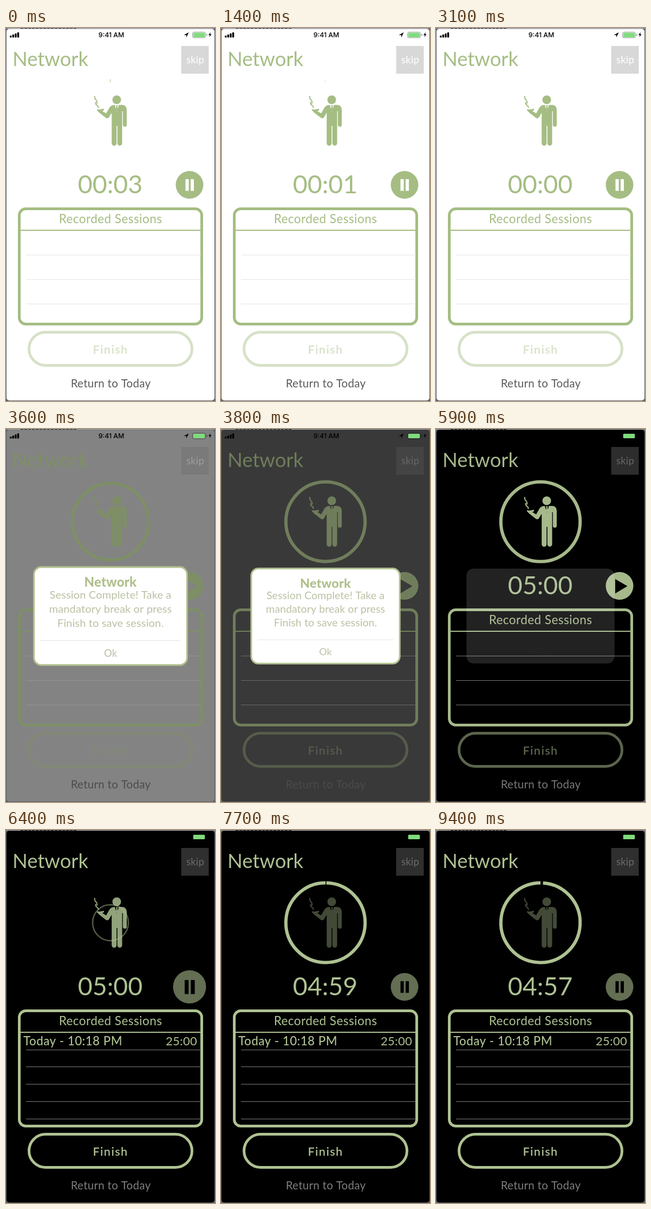
Write an HTML page with a canvas that moves like this. It is 386 px wide and 686 px high and loops after 9500 ms.

```html
<!DOCTYPE html>
<html lang="en">
<head>
<meta charset="utf-8">
<title>Session timer</title>
<style>
  html, body { margin: 0; overflow: hidden; background: #5a5c66; }
  canvas { display: block; width: 386px; height: 686px; }
</style>
</head>
<body>
<canvas id="stage" width="386" height="686"></canvas>
<script>
const ctx = document.getElementById('stage').getContext('2d');
const LOOP = 9500, ALERT = 3500, DISMISS = 5600, START = 6200;

const man = new Path2D(`
  M196.500 132a8 8 0 1 1 16 0a8 8 0 1 1 -16 0z
  M201 141.500L204.500 154L208.500 141.500H215Q223 142 223 151V178a3.600 3.600 0 0 1 -7.200 0V153H214.500
  V212a4.400 4.400 0 0 1 -8.800 0V180H204.200V212a4.500 4.500 0 0 1 -9 0V156L190 164.500
  Q187.500 167.500 183.500 164.500L172 155.500Q170 153 168 151.500V149.500L173 150L181 148.500V151L178 153L185 157
  L191 146.500Q194 141.500 201 141.500z
  M203 142H206.500L205.800 145L207 150L204.800 153L202.800 150L203.800 145z`);
const smoke = new Path2D('M164 125Q163 129 166 132T168 139M165.500 136Q165 140 168 142T170.500 147');
const arrow = new Path2D('M328.500 13L337.500 8L333 17.500V13z');
const bolt = new Path2D('M378 7.500L374 13H376.500L375.500 17L379.500 11.500H377z');
const play = new Path2D('M331 276L353.500 289L331 302.500z');

const clamp = x => Math.max(0, Math.min(1, x));
const span = (t, from, to) => clamp((t - from) / (to - from));
const smooth = p => p * p * (3 - 2 * p);
const blend = (a, b, p) => `rgb(${a.map((v, i) => v + (b[i] - v) * p)})`;
const grey = (a, b, p) => blend([a, a, a], [b, b, b], p);

function text(str, x, y, size, color, { weight = 400, align = 'center', space = 0, family = 'Lato' } = {}) {
  ctx.font = `${weight} ${size}px ${family}, sans-serif`;
  ctx.letterSpacing = space + 'px';
  ctx.textAlign = align;
  ctx.fillStyle = color;
  ctx.fillText(str, x, y);
}

function box(x, y, w, h, r, { fill, stroke, width = 1 }) {
  ctx.beginPath();
  ctx.roundRect(x, y, w, h, r);
  if (fill) { ctx.fillStyle = fill; ctx.fill(); }
  if (stroke) { ctx.strokeStyle = stroke; ctx.lineWidth = width; ctx.stroke(); }
}

function rule(y, x1, x2, color, width = 1) {
  ctx.fillStyle = color;
  ctx.fillRect(x1, y, x2 - x1, width);
}

// Draws a part with its own opacity and its own scale about (x, y)
function group(alpha, scale, x, y, draw) {
  ctx.save();
  ctx.globalAlpha *= alpha;
  ctx.translate(x, y);
  ctx.scale(scale, scale);
  ctx.translate(-x, -y);
  draw();
  ctx.restore();
}

function drawStatus() {
  for (let i = 0; i < 4; i++) box(7 + i * 4.6, 14 - i * 2, 3.4, 3.5 + i * 2, 1, { fill: '#000' });
  text('9:41 AM', 194.5, 17, 12.3, '#000', { weight: 500, family: 'Inter' });
  ctx.fill(arrow);
  box(344.5, 7.5, 24, 10.5, 3, { stroke: 'rgba(0,0,0,.4)' });
  box(345.7, 8.7, 21.5, 8.3, 1.5, { fill: '#7fdc7c' });
  box(370, 10.8, 1.5, 4, 1, { fill: 'rgba(0,0,0,.4)' });
  ctx.fillStyle = '#000';
  ctx.fill(bolt);
}

function drawRing(green, left, scale, alpha) {
  group(alpha, scale, 193, 170.5, () => {
    ctx.beginPath();
    ctx.arc(193, 170.5, 73.2, -Math.PI / 2 - left * 2 * Math.PI, -Math.PI / 2);
    ctx.strokeStyle = green;
    ctx.lineWidth = 6;
    ctx.stroke();
  });
}

function drawButton(green, back, running, scale, alpha) {
  group(1, scale, 339, 288.5, () => {
    group(alpha, 1, 0, 0, () => box(313.5, 263, 51, 51, 25.5, { fill: green }));
    ctx.fillStyle = back;
    if (running) {
      ctx.fillRect(331.5, 278, 6, 21.5);
      ctx.fillRect(341, 278, 6, 21.5);
    } else {
      ctx.fill(play);
    }
  });
}

function drawAlert(alpha, scale, divider) {
  const green = '#b0bf8c', soft = '#bac2a4';
  group(alpha, scale, 193, 344, () => {
    box(56.5, 257, 273, 174, 13, { fill: '#fff' });
    // Contents fade with the panel below them
    ctx.globalAlpha *= alpha;
    box(56.5, 257, 273, 174, 13, { stroke: green, width: 3 });
    text('Network', 193, 292, 23.2, green, { weight: 800, space: 0.2 });
    ['Session Complete! Take a', 'mandatory break or press', 'Finish to save session.']
      .forEach((line, i) => text(line, 193, 313 + i * 25, 19.4, soft, { space: 0.1 }));
    rule(387, 68, 318, `rgba(225,225,225,${divider})`);
    text('Ok', 193, 416, 18, soft);
  });
}

function clock(t) {
  if (t < ALERT) return 3 - (t >= 400) - (t >= 1400) - (t >= 2400);
  return 300 - Math.floor(Math.max(0, t - 6300) / 1000);
}

function draw(t) {
  const dark = span(t, 3420, 4000);
  const green = blend([165, 189, 131], [174, 194, 146], dark);
  const back = grey(255, 0, dark);
  const isBreak = t >= ALERT, started = t >= START;
  const pop = smooth(span(t, START, 6630));
  const secs = clock(t);
  const fade = t < START ? Math.exp(-Math.max(0, t - DISMISS) / 150) : 0;
  const alertAlpha = fade * span(t, 3430, 3590);
  const dim = 0.35 * fade * span(t, 3430, 3670);

  ctx.fillStyle = '#5a5c66';
  ctx.fillRect(0, 0, 386, 686);
  rule(0, 0, 386, '#a9abb2');
  for (let x = 27; x < 126; x += 7) rule(0, x, x + 5, '#33343a', 1.5);

  ctx.save();
  box(1, 1.5, 384, 683.5, 5, { fill: back });
  ctx.clip();

  text('Network', 12, 70, 36.4, green, { align: 'left' });
  box(323.5, 33, 51, 51, 0, { fill: grey(216, 47, dark) });
  text('skip', 349.5, 65, 18.5, grey(255, 106, dark), { space: 0.2 });

  group(1 - 0.62 * span(t, START, 7000), 1, 0, 0, () => {
    ctx.fillStyle = ctx.strokeStyle = green;
    ctx.lineWidth = 2;
    ctx.fill(man);
    ctx.stroke(smoke);
  });

  if (!isBreak) drawRing(green, secs / 1500, 1, 1);
  else if (started) drawRing(green, secs / 300, pop, pop);
  else drawRing(green, 1, 1 - Math.exp((3440 - t) / 50), 1);

  const two = n => String(n).padStart(2, '0');
  text(two(Math.floor(secs / 60)) + ':' + two(secs % 60), 192.5, 304, 46.5, green);
  drawButton(green, back, !isBreak || started, 1 + 0.2 * Math.sin(Math.PI * pop), started ? 0.57 : 1);

  box(24.5, 332.5, 337, 212, 12, { stroke: green, width: 5 });
  text('Recorded Sessions', 193, 359, 22.5, green, { space: 0.45 });
  rule(371, 27, 360, green, 2);
  const lines = started ? [404, 435, 467, 499, 531] : [417, 462, 507];
  lines.forEach(y => rule(y, 37, 360, grey(229, 125, dark)));
  if (started) {
    text('Today - 10:18 PM', 32, 395.5, 22.3, green, { weight: 500, align: 'left', space: 0.5 });
    text('25:00', 353, 395.5, 22, green, { align: 'right', space: 0.3 });
  }

  group(started ? 1 : 0.45 + 0.1 * dark, 1, 0, 0, () => {
    box(42.5, 559.5, 301, 61, 30.5, { stroke: green, width: 5 });
    text('Finish', 193, 599, 21.7, green, { weight: 600, space: 1.4 });
  });
  text('Return to Today', 193.5, 661, 20.5, grey(90, 126, dark), { space: 0.3 });

  ctx.fillStyle = `rgba(0,0,0,${dim})`;
  ctx.fillRect(0, 0, 386, 686);
  if (alertAlpha) {
    const grow = t < DISMISS ? 0.1 * Math.exp((ALERT - t) / 100) : 0;
    drawAlert(alertAlpha, 1 + grow, 1 - span(t, 3700, 4300));
  }
  drawStatus();
  ctx.restore();
}

function tick() {
  draw(performance.now() % LOOP);
  requestAnimationFrame(tick);
}
tick();
</script>
</body>
</html>
```
